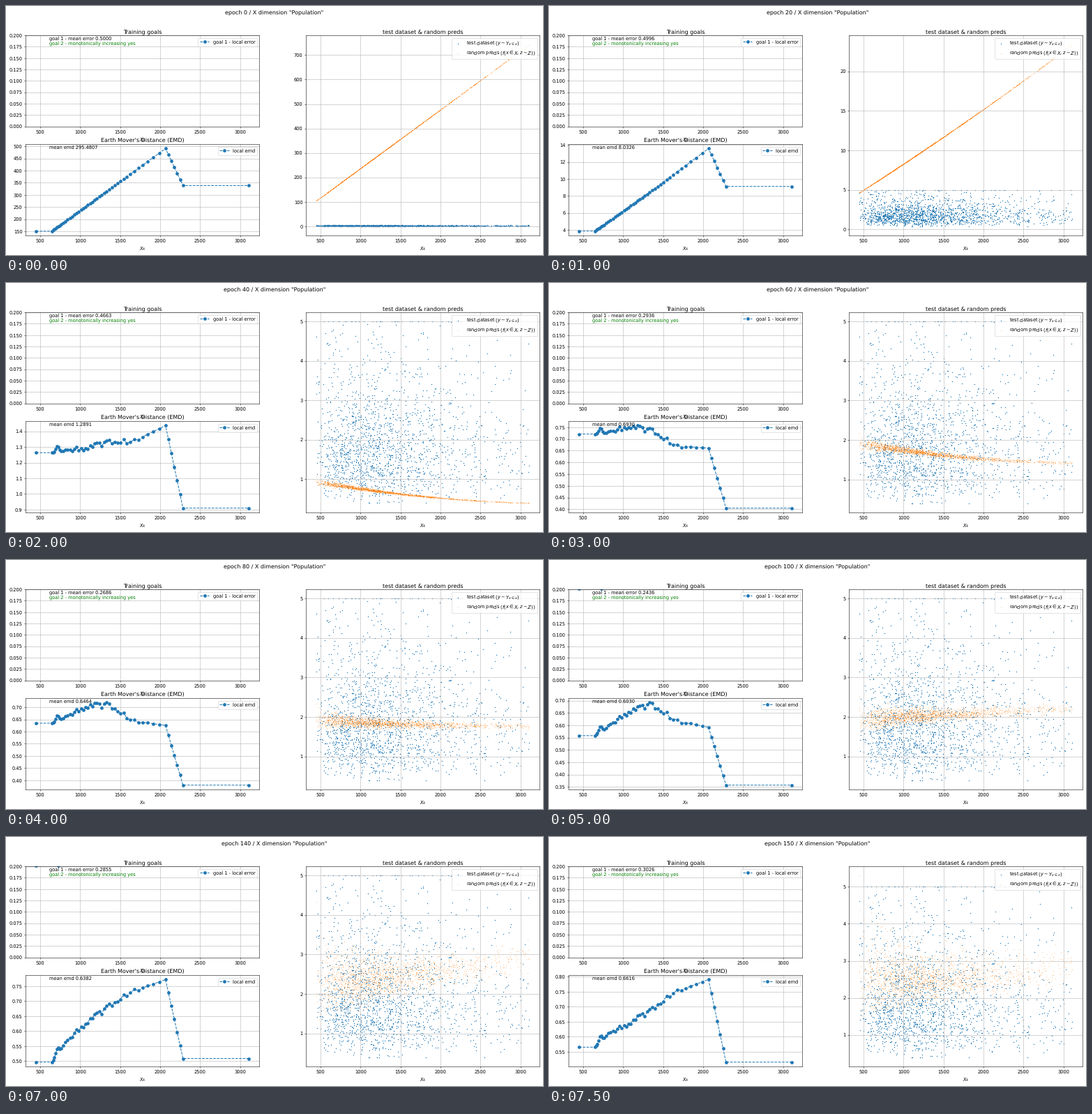
Write a matplotlib script that moves like this. It is 770x357 px and loops after 8 s.

```python
import numpy as np
import matplotlib.pyplot as plt
from matplotlib.animation import FuncAnimation

W, H, DPI = 770, 357, 48
FRAMES, INTERVAL, STEP = 16, 500, 10
BLUE, ORANGE = "C0", "C1"
X_LO, X_HI = 451, 3107
Z_MAX = 2.79

plt.rcParams.update({"font.family": "DejaVu Sans", "font.size": 10,
                     "text.hinting": "none"})

# Training checkpoints; everything between them is blended.
EPOCHS = [0, 20, 40, 60, 100, 120, 150]
ERR_MEAN = [0.5, 0.4996, 0.4663, 0.2936, 0.2436, 0.2512, 0.3026]
EMD_MEAN = [295.4807, 8.0326, 1.2891, 0.6930, 0.6030, 0.5939, 0.6616]

# Prediction centre at three x positions, and relative spread at low x.
PRED_X = [450, 1500, 3100]
CENTRE = [(105.5, 357.5, 741.5), (4.67, 11.7, 23.3), (0.94, 0.63, 0.4),
          (1.92, 1.62, 1.43), (1.95, 2.06, 2.22), (1.8, 2.33, 2.97),
          (2.5, 2.52, 2.87)]
SPREAD = [0.003, 0.005, 0.05, 0.045, 0.09, 0.17, 0.27]


def blend(epoch, values, log=False):
    """Interpolate checkpoint rows at an epoch, optionally in log space."""
    rows = np.asarray(values, float)
    rows = np.log(rows) if log else rows
    cols = rows.reshape(len(EPOCHS), -1).T
    out = np.array([np.interp(epoch, EPOCHS, c) for c in cols])
    out = np.exp(out) if log else out
    return out if rows.ndim > 1 else out[0]


def centre_at(x, centre):
    fit = np.polyfit(np.array(PRED_X) / 1000, centre, 2)
    return np.polyval(fit, np.asarray(x) / 1000)


# Local EMD at a few x positions. While predictions lie far above the data
# it is just their height over the data mean; the last window mixes all x.
EMD_X = [646, 800, 1070, 1340, 1650, 2067, 2285]
EMD = [centre_at(EMD_X[:-1] + [1430], c) - 2.1 for c in CENTRE[:2]] + [
    (1.264, 1.274, 1.306, 1.343, 1.332, 1.438, 0.909),
    (0.721, 0.725, 0.761, 0.747, 0.670, 0.661, 0.405),
    (0.558, 0.592, 0.663, 0.694, 0.619, 0.592, 0.357),
    (0.384, 0.472, 0.603, 0.673, 0.698, 0.737, 0.497),
    (0.565, 0.606, 0.650, 0.694, 0.749, 0.791, 0.515),
]


def window_centres():
    """Tight windows first, then ever wider ones, a tail and the far end."""
    k = np.arange(1, 36)
    body = 759 + 28 * k + 328 * (k / 35) ** 6
    tail = np.linspace(body[-1], 2285, 7)[1:]
    return np.concatenate([[449], np.linspace(646, 759, 8), body, tail, [3105]])


def make_samples(n=1700):
    rng = np.random.default_rng(4)
    x = 1250 * np.exp(rng.normal(0, 0.5, 2 * n))
    x = x[(x > X_LO) & (x < X_HI)][:n]
    x[:2] = X_LO, X_HI
    y = np.clip(np.exp(rng.normal(0.57, 0.53, n)), 0.4, 5)
    return x, y


win_x = window_centres()
test_x, test_y = make_samples()
wiggle = np.random.default_rng(7).normal(0, 0.022, len(win_x))
wiggle[(win_x < 800) | (win_x > 1900)] = 0
bump = 0.07 * np.exp(-((win_x - 715) / 25) ** 2)


def emd_curve(epoch):
    keys = blend(epoch, EMD, log=True)
    rough = np.clip((epoch - 20) / 20, 0, 1) * np.ptp(keys)
    return np.interp(win_x, EMD_X, keys) + rough * (wiggle + bump)


def local_error(epoch, x):
    base = 0.1625 + 0.002 * abs(epoch - 120)
    return base + 1.95e-4 * np.maximum(0, x - 724)


def predictions(epoch):
    z = np.random.default_rng(100 + epoch).normal(size=len(test_x))
    z = np.clip(z, -Z_MAX, Z_MAX)
    z[0] = Z_MAX
    spread = blend(epoch, SPREAD) * (test_x / 450) ** -0.65
    return centre_at(test_x, blend(epoch, CENTRE, log=True)) * np.exp(spread * z)


def fit_y(ax, lo, hi):
    pad = 0.05 * (hi - lo)
    ax.set_ylim(lo - pad, hi + pad)


def add_axes(left, top, height, title):
    ax = fig.add_axes([left / W, 1 - (top + height) / H, 335 / W, height / H])
    ax.set_title(title, pad=4.8)
    ax.set_xlabel("$X_4$")
    ax.set_xlim(318.5, 3239.5)
    ax.grid(True)
    return ax


def note(ax, y, color="k"):
    return ax.text(0.1, y, "", color=color, transform=ax.transAxes)


def dots(size, color, label):
    return data_ax.scatter(test_x, test_y, s=size, color=color, label=label)


fig = plt.figure(figsize=(W / DPI, H / DPI), dpi=DPI, facecolor="white")
head = fig.text(0.5, 1 - 11 / H, "", fontsize=12, ha="center")

goal_ax = add_axes(28.2, 42.2, 130.3, "Training goals")
emd_ax = add_axes(28.2, 198.4, 130.3, "Earth Mover's Distance (EMD)")
data_ax = add_axes(430.2, 42.2, 286.5, "test dataset & random preds")

goal_ax.set_ylim(0, 0.2)
err_x = np.append(449, np.linspace(724, 3105, 125))
err_line, = goal_ax.plot([], [], "o--", color=BLUE, label="goal 1 - local error")
emd_line, = emd_ax.plot([], [], "o--", color=BLUE, label="local emd")
err_note = note(goal_ax, 0.95)
note(goal_ax, 0.9, "g").set_text("goal 2 - monotonically increasing yes")
emd_note = note(emd_ax, 0.95)

dots(1, BLUE, r"test dataset ($y \sim Y_{x \in x}$)")
preds = dots(0.1, ORANGE, r"random preds ($f(x \in X, z \sim Z)$)")
for ax in (goal_ax, emd_ax, data_ax):
    ax.legend(loc="upper right")


def draw(i):
    epoch = i * STEP
    head.set_text(f'epoch {epoch} / X dimension "Population"')

    err_line.set_data(err_x, local_error(epoch, err_x))
    err_note.set_text(f"goal 1 - mean error {blend(epoch, ERR_MEAN):.4f}")

    emd = emd_curve(epoch)
    emd_line.set_data(win_x, emd)
    fit_y(emd_ax, emd.min(), emd.max())
    emd_note.set_text(f"mean emd {blend(epoch, EMD_MEAN, log=True):.4f}")

    y = predictions(epoch)
    preds.set_offsets(np.column_stack([test_x, y]))
    fit_y(data_ax, min(test_y.min(), y.min()), max(test_y.max(), y.max()))
    return []


anim = FuncAnimation(fig, draw, frames=FRAMES, interval=INTERVAL,
                     init_func=lambda: draw(0), repeat=True, repeat_delay=0,
                     blit=False)
plt.show()
```
